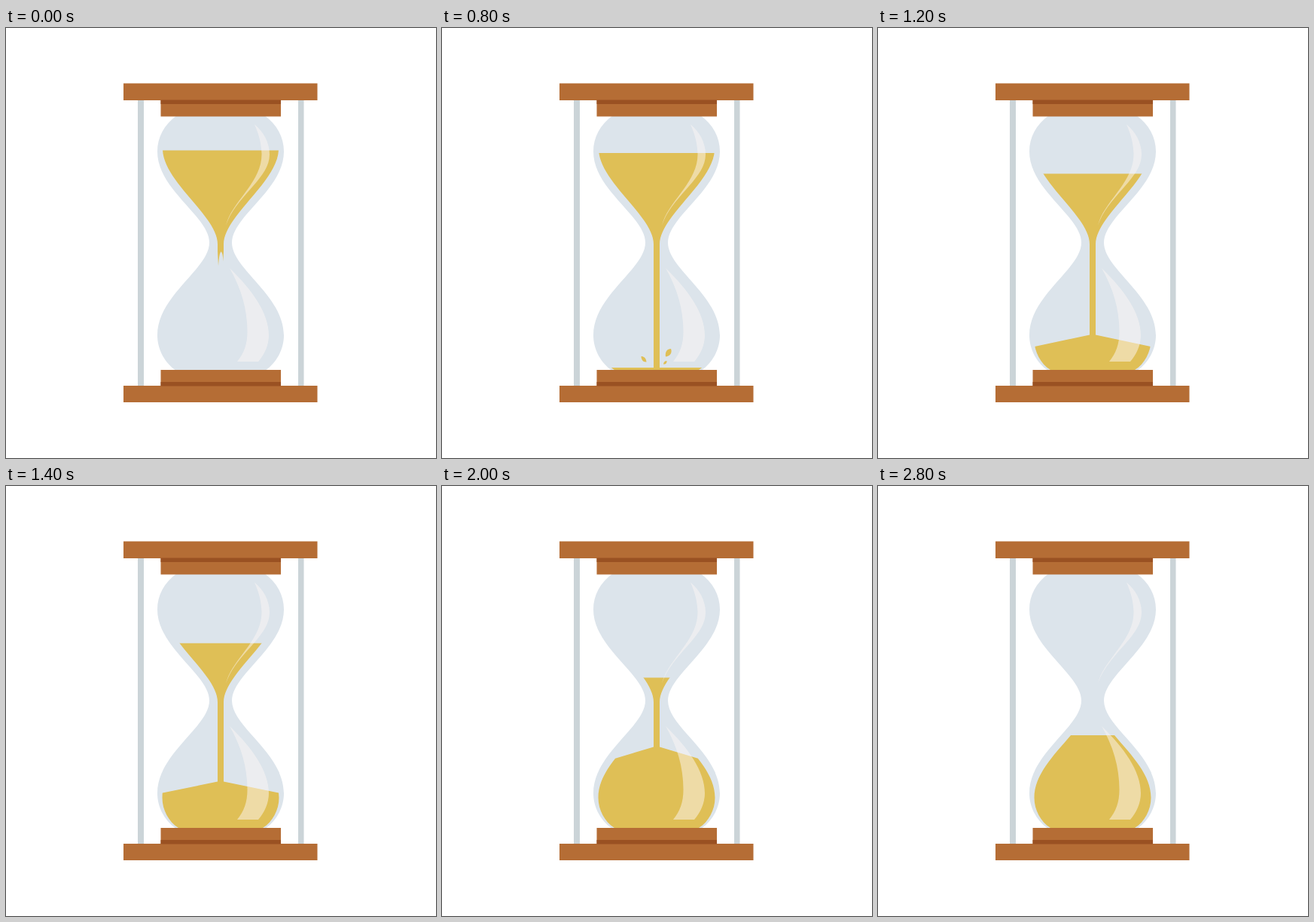
These frames come from a looping animation (571 px wide and 571 px high, 3000 ms). An HTML page:

```html
<!DOCTYPE html>
<html lang="en">
<head>
<meta charset="utf-8">
<title>Hourglass</title>
<style>
  html, body { margin: 0; width: 100%; height: 100%; overflow: hidden; background: #fff; }
  svg { display: block; width: 100%; height: 100%; }
  .wood { fill: #b56d35; }
  .shade { fill: #9a5122; }
  .post { fill: #cbd4d8; }
  .glass { fill: #dce4eb; }
  .sand { fill: #dfbf56; }
  .shine { fill: #fdf8f6; fill-opacity: .5; }
</style>
</head>
<body>
<svg viewBox="0 0 571 571">
  <defs>
    <clipPath id="funnel">
      <path d="M208 162 C210 205 281 250 281 287 H289 C289 250 360 205 362 162Z"/>
    </clipPath>
    <clipPath id="bowl">
      <path d="M256 331 C232 359 207.5 384 207.5 414 C207.5 430 216 446 229 454
               H341 C354 446 362.5 430 362.5 414 C362.5 384 338 359 314 331Z"/>
    </clipPath>
  </defs>

  <path class="post" d="M175 95H183V476H175Z M388 95H395.5V476H388Z"/>
  <path class="glass" d="M227 116 C210 128 201 145 201 164 C201 215 270 250 270 285
    C270 320 201 355 201 408 C201 427 211 445 226 455 H344
    C359 445 369 427 369 408 C369 355 300 320 300 285
    C300 250 369 215 369 164 C369 145 360 128 343 116Z"/>

  <g class="sand">
    <g clip-path="url(#funnel)"><path id="upper"/></g>
    <path id="stream"/>
    <g clip-path="url(#bowl)"><path id="pile"/></g>
    <path id="drops" d="M264.5 436 C268 436 271 438 271.5 443.5 C267 444 264.5 440 264.5 436Z
      M304 426 C306 431 303 436 297 436.5 C296 430 299 426 304 426Z
      M298.5 442 C299 445 297 447 294 446.5 C294 444 296 442 298.5 442Z"/>
  </g>

  <path class="shine" d="M330 128 C342 138 350 152 350 168 C350 200 306 222 292 262
    C300 230 340 205 339.5 167 C339 152 335 139 330 128Z"/>
  <path class="shine" d="M297 319 C326 347 349 378 349 408 C349 421 343 434 335 443
    H307 C316 432 320.5 420 320.5 403 C320.5 373 312 345 297 319Z"/>

  <path class="wood" d="M156 73.5H413.5V96H156Z M205.5 96H365V117.5H205.5Z
    M205.5 454H365V476H205.5Z M156 475H413.5V497H156Z"/>
  <path class="shade" d="M205.5 95.5H365V101H205.5Z M205.5 470H365V475.5H205.5Z"/>
</svg>
<script>
  const STEP = 200, STEPS = 15;
  const part = id => document.getElementById(id);
  const draw = (id, d) => part(id).setAttribute('d', d);

  // Pile poses by step: peak y, shoulder y, shoulder x
  const pilePoses = {
    4: [451, 451, 225], 5: [423, 438, 213], 6: [407.5, 423, 208],
    7: [392.5, 407.5, 208], 8: [377, 392.5, 212], 9: [361.5, 377, 220],
    10: [346.5, 361.5, 231], 11: [333, 346.5, 243], 12: [331, 338, 250]
  };
  const fullPile = [331, 331, 256];

  function sandLevel(step) {
    if (step < 4) return 162.5;
    if (step === 4) return 166;
    if (step === 5) return 179;
    if (step < 12) return 193.5 + (step - 6) * 15.25;
    return 307;
  }

  // The falling front ends in two points with a notch between them
  function fallingStream(step) {
    const notch = 297 + 31 * step;
    const left = 316 + 37 * step;
    const right = 310 + 30.5 * step;
    return `M281 284V${notch}L282 ${left}Q283 ${notch + 2} 285.5 ${notch}` +
      `Q288 ${notch + 1} 288.3 ${right}L289 ${notch}V284Z`;
  }

  function render(step) {
    const level = sandLevel(step);
    draw('upper', `M200 ${level}H370V${Math.max(level, 300)}H200Z`);

    const [peak, shoulder, x] = pilePoses[step] || fullPile;
    draw('pile', step < 4 ? '' :
      `M281 ${peak}H289L${570 - x} ${shoulder}H370V455H200V${shoulder}H${x}Z`);

    const top = Math.max(284, level);
    draw('stream', step < 4 ? fallingStream(step) :
      step < 13 ? `M281 ${top}H289V${peak + 1}H281Z` : '');
    part('drops').style.display = step === 4 ? '' : 'none';
  }

  function tick(now) {
    render(Math.floor(now / STEP) % STEPS);
    requestAnimationFrame(tick);
  }
  render(0);
  requestAnimationFrame(tick);
</script>
</body>
</html>
```
